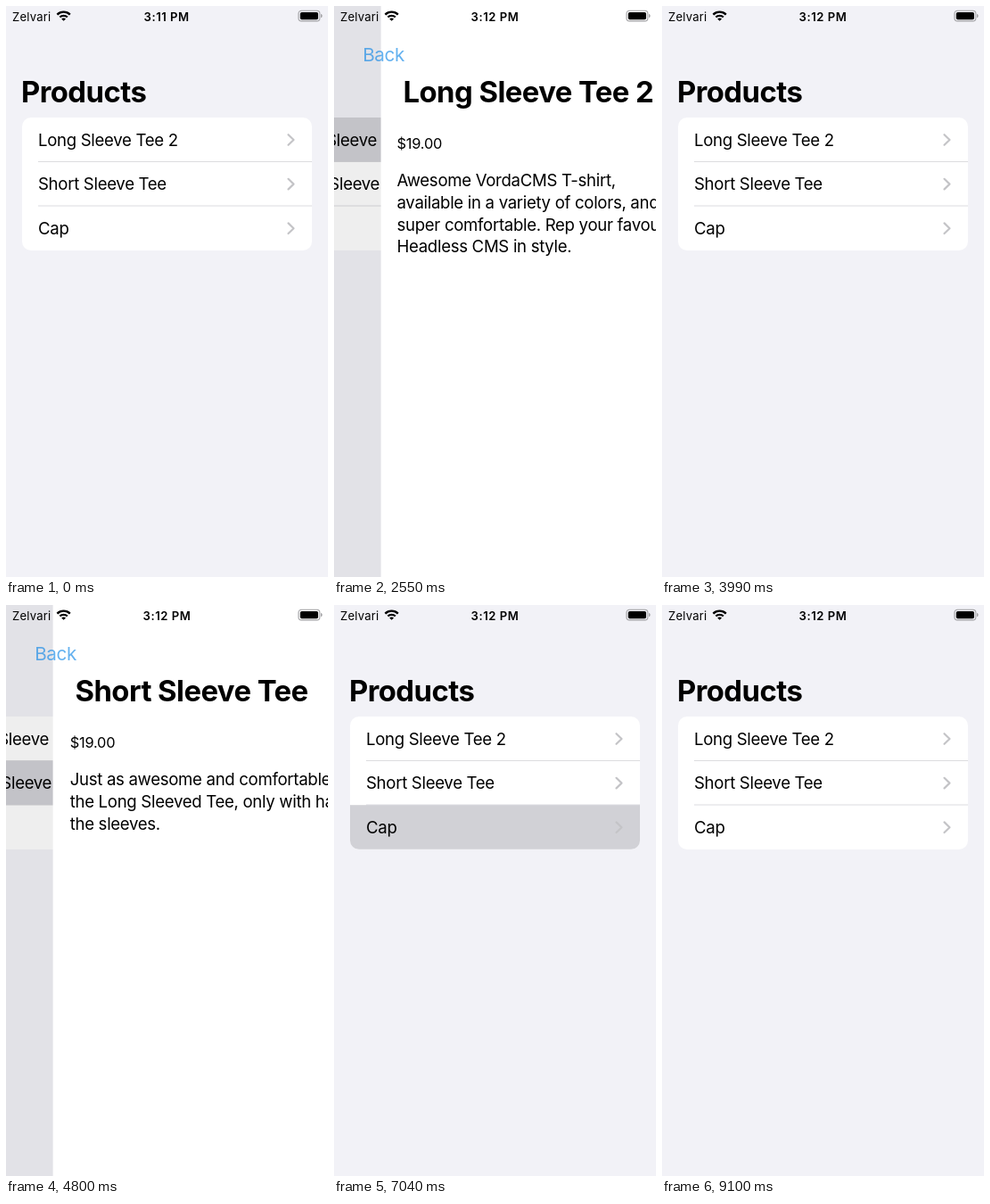
An HTML page with a canvas that plays this animation: 361x640 px, repeating every 9200 ms.

```html
<!DOCTYPE html>
<html lang="en">
<head>
<meta charset="utf-8">
<title>Products</title>
<style>
html, body { margin: 0; width: 100%; height: 100%; overflow: hidden; background: #f2f2f7; }
canvas { display: block; width: 361px; height: 640px; }
</style>
</head>
<body>
<canvas></canvas>
<script>
const W = 361, H = 640, LOOP = 9200;
const BLUE = '#0b84e6', FADED = '#4a6fc0';
const canvas = document.querySelector('canvas');
const ctx = canvas.getContext('2d');
const dpr = window.devicePixelRatio || 1;
canvas.width = W * dpr;
canvas.height = H * dpr;

// weight, size in px, tracking in em
const FONT = {
  title: [700, 32.8, -0.016],
  body: [400, 18.6, -0.0165],
  price: [400, 16.4, -0.013],
  clock: [600, 13.1, 0.04],
  status: [400, 13.1, 0.015]
};

const items = [
  { name: 'Long Sleeve Tee 2', price: '$19.00', x: 17.9, back: 'Back',
    lines: ['Awesome VordaCMS T-shirt,', 'available in a variety of colors, and',
      'super comfortable. Rep your favourite', 'Headless CMS in style.'] },
  { name: 'Short Sleeve Tee', price: '$19.00', x: 19.1, back: 'Back',
    lines: ['Just as awesome and comfortable as', 'the Long Sleeved Tee, only with half', 'the sleeves.'] },
  { name: 'Cap', price: '$2.00', x: 48.3, back: 'Products',
    lines: ['Awesome new VordaCMS cap!'] }
];

// Screen updates come in even steps; delay is the step at which a pop starts sliding.
const visits = [
  { item: 0, push: [2330, 2880, 5], pop: [3410, 3990, 5], delay: 0.805 },
  { item: 1, push: [4580, 5100, 5], pop: [5690, 6260, 5], delay: 1 },
  { item: 2, push: [7040, 7590, 5], pop: [8440, 9100, 6], delay: 1 }
];

const clamp = v => Math.max(0, Math.min(1, v));
const mix = (a, b, k) => a + (b - a) * k;

function stepAt(t, [start, end, count]) {
  return Math.min(count, Math.floor((t - start) / (end - start) * count + 1e-6));
}

// Critically damped spring, time in steps
function spring(n) {
  const k = 1.705 * Math.max(0, n);
  return 1 - (1 + k) * Math.exp(-k);
}

function text(str, x, y, style, color = '#000', alpha = 1, scale = 1) {
  if (alpha <= 0) return;
  const [weight, size, tracking] = FONT[style];
  ctx.save();
  ctx.globalAlpha = alpha;
  ctx.translate(x, y);
  ctx.scale(scale, scale);
  ctx.font = `${weight} ${size}px Inter, "Liberation Sans", sans-serif`;
  ctx.letterSpacing = size * tracking + 'px';
  ctx.fillStyle = color;
  ctx.fillText(str, 0, 0);
  ctx.restore();
}

function rect(x, y, w, h, color) {
  ctx.fillStyle = color;
  ctx.fillRect(x, y, w, h);
}

function roundRect(x, y, w, h, r) {
  ctx.beginPath();
  ctx.roundRect(x, y, w, h, r);
}

// dx is negative for a left-pointing arrow
function chevron(x, y, dx, dy, width, color, alpha = 1) {
  if (alpha <= 0) return;
  ctx.save();
  ctx.globalAlpha = alpha;
  ctx.beginPath();
  ctx.moveTo(x - dx, y - dy);
  ctx.lineTo(x, y);
  ctx.lineTo(x - dx, y + dy);
  ctx.strokeStyle = color;
  ctx.lineWidth = width;
  ctx.lineCap = ctx.lineJoin = 'round';
  ctx.stroke();
  ctx.restore();
}

function drawList(p, selected, glow) {
  rect(0, 0, W, H, '#f2f2f7');
  ctx.save();
  ctx.translate(-0.3 * W * p, 0);
  ctx.save();
  roundRect(18, 125, 325, 149, 10);
  ctx.clip();
  rect(18, 125, 325, 149, '#fff');
  rect(36, 174, 307, 1, '#dcdcdf');
  rect(36, 223.5, 307, 1, '#dcdcdf');
  if (selected >= 0) {
    ctx.globalAlpha = glow;
    rect(18, 125 + 49.6 * selected, 325, 49.6, '#d1d1d6');
    ctx.globalAlpha = 1;
  }
  ctx.restore();
  items.forEach((item, i) => {
    const y = 150 + 49.6 * i;
    text(item.name, 36, y + 6.8, 'body');
    chevron(322.5, y, 6, 5.8, 2.2, '#c4c4c7');
  });
  ctx.restore();
  rect(0, 0, W, H, `rgba(0,0,0,${0.08 * p})`);
}

function drawPage(item, left) {
  rect(left, 0, W, H, '#fff');
  text(item.price, left + item.x, 159.5, 'price');
  item.lines.forEach((line, i) => text(line, left + item.x, 202 + 24.8 * i, 'body'));
}

function drawNav(item, p, popping, step) {
  const rest = 1 - p;
  const titleX = 17 + rest * W * (popping ? 0.85 : 1.15);
  text(item.name, titleX, 107.5, 'title', '#000', popping ? 1 - 1.5 * rest : 1);

  // The list heading and the back label share one path.
  const x = mix(32.5, 17, rest * rest), y = mix(54.6, 107.5, rest);
  const grow = FONT.title[1] / FONT.body[1];
  const size = mix(1, grow, rest);
  const heading = popping ? clamp((rest - 0.4) / 0.6) : clamp(1 - 1.6 * p);
  text('Products', x, y, 'title', '#000', heading, size / grow);

  let label = clamp((p - 0.6) / 0.4), arrow = clamp((p - 0.9) / 0.1);
  if (popping) label = arrow = step ? 0.18 * clamp(1 - 3 * rest) : 0.5;
  const color = popping ? FADED : BLUE;
  text(item.back, x, y, 'body', color, label, size);
  chevron(12 + 55 * rest, 47.5, -9.5, 9.3, 2.8, color, arrow);
}

function drawStatus(t) {
  text('Zelvari', 7, 16.5, 'status');
  const late = t >= 1130;
  text(late ? '3:12 PM' : '3:11 PM', late ? 153.6 : 154.6, 16.5, 'clock');

  ctx.strokeStyle = ctx.fillStyle = '#000';
  [[1.7, 3.4], [6, 2.3], [10.2, 2.3]].forEach(([r, width]) => {
    ctx.beginPath();
    ctx.arc(64.6, 16.8, r, -0.75 * Math.PI, -0.25 * Math.PI);
    ctx.lineWidth = width;
    ctx.stroke();
  });

  roundRect(328, 5.2, 23.8, 11.7, 3.2);
  ctx.strokeStyle = '#a2a2a5';
  ctx.lineWidth = 1.1;
  ctx.stroke();
  roundRect(329.8, 6.9, 20.2, 8.3, 1.8);
  ctx.fill();
  roundRect(353, 9, 1.5, 4, [0, 1.5, 1.5, 0]);
  ctx.fillStyle = '#a2a2a5';
  ctx.fill();
}

function draw(now) {
  const t = now % LOOP;
  ctx.setTransform(dpr, 0, 0, dpr, 0, 0);
  const visit = visits.find(v => t >= v.push[0] && t < v.pop[1]);
  if (visit) {
    const popping = t >= visit.pop[0];
    const span = popping ? visit.pop : visit.push;
    const step = stepAt(t, span);
    let p = step === span[2] ? 1 : spring(popping ? step - visit.delay : step);
    if (popping) p = 1 - p;
    const item = items[visit.item];
    drawList(p, visit.item, popping ? p : 1);
    drawPage(item, (1 - p) * W);
    drawNav(item, p, popping, step);
  } else {
    drawList(0, -1, 0);
    text('Products', 17, 107.5, 'title');
  }
  drawStatus(t);
  requestAnimationFrame(draw);
}
requestAnimationFrame(draw);
</script>
</body>
</html>
```
